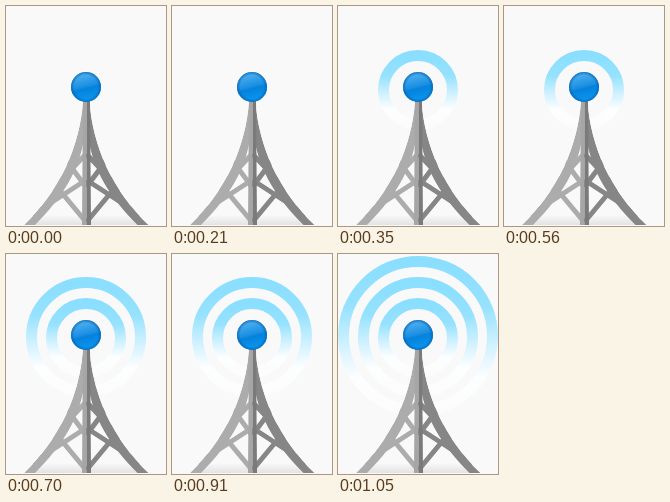
Animation, 160 px wide and 220 px high, one loop 1400 ms. Source, as an HTML page:

```html
<!DOCTYPE html>
<html lang="en">
<head>
<meta charset="utf-8">
<title>Radio tower</title>
<style>
  html, body { margin: 0; width: 100%; height: 100%; overflow: hidden; background: #f9f9f9; }
  svg { display: block; width: 100vw; height: 100vh; }
</style>
</head>
<body>
<svg viewBox="0 0 160 220">
  <defs>
    <linearGradient id="wave" x1="0" y1="0" x2="0" y2="1">
      <stop offset="0" stop-color="#8adeff"/>
      <stop offset="0.3" stop-color="#96e2ff"/>
      <stop offset="0.52" stop-color="#c8efff"/>
      <stop offset="0.78" stop-color="#fdfeff"/>
      <stop offset="1" stop-color="#fcfcfc"/>
    </linearGradient>
    <linearGradient id="ball" x1="0.35" y1="0" x2="0.6" y2="1">
      <stop offset="0" stop-color="#55b4f2"/>
      <stop offset="0.48" stop-color="#1b8fe2"/>
      <stop offset="0.56" stop-color="#0482dc"/>
      <stop offset="1" stop-color="#0d98f2"/>
    </linearGradient>
    <radialGradient id="rim">
      <stop offset="0.78" stop-color="#0560ac" stop-opacity="0"/>
      <stop offset="1" stop-color="#0560ac" stop-opacity="0.75"/>
    </radialGradient>
    <linearGradient id="shadow" x1="0" y1="0" x2="0" y2="1">
      <stop offset="0" stop-color="#ccc" stop-opacity="0"/>
      <stop offset="1" stop-color="#ccc" stop-opacity="0.5"/>
    </linearGradient>
    <clipPath id="outline">
      <path d="M77 95C74 140 54 185 18 219H81V95Z"/>
    </clipPath>
    <g id="side" clip-path="url(#outline)">
      <path stroke="none" d="M77 95C74 140 54 185 18 219H29C58 190 72 164 77 138Z"/>
      <path d="M60 154L80 181M80 148L46 184M46 175L80 216M80 174L26 209" fill="none" stroke-width="5"/>
    </g>
  </defs>

  <g id="waves" fill="none" stroke="url(#wave)" stroke-width="11"></g>

  <path d="M22 219L36 209H125L139 219Z" fill="url(#shadow)"/>
  <use href="#side" fill="#acacac" stroke="#acacac"/>
  <use href="#side" fill="#868686" stroke="#868686" transform="translate(160.5) scale(-1 1)"/>
  <path d="M77 95H80.5V219H76Z" fill="#a6a6a6"/>
  <path d="M80.5 95H84L85 219H80.5Z" fill="#7a7a7a"/>

  <circle cx="80" cy="81" r="15" fill="url(#ball)"/>
  <circle cx="80" cy="81" r="15" fill="url(#rim)"/>
</svg>
<script>
  const STEP = 350;
  const RING_COUNT = 3;
  const waves = document.getElementById("waves");

  const rings = Array.from({ length: RING_COUNT }, (_, i) => {
    const ring = document.createElementNS("http://www.w3.org/2000/svg", "circle");
    ring.setAttribute("cx", 80);
    ring.setAttribute("cy", 84 - i);
    ring.setAttribute("r", 34.5 + 20 * i);
    return waves.appendChild(ring);
  });

  // One more ring appears at each step, then all vanish.
  function draw() {
    const visible = Math.floor(performance.now() / STEP) % (RING_COUNT + 1);
    rings.forEach((ring, i) => {
      ring.style.display = i < visible ? "" : "none";
    });
    requestAnimationFrame(draw);
  }
  draw();
</script>
</body>
</html>
```
